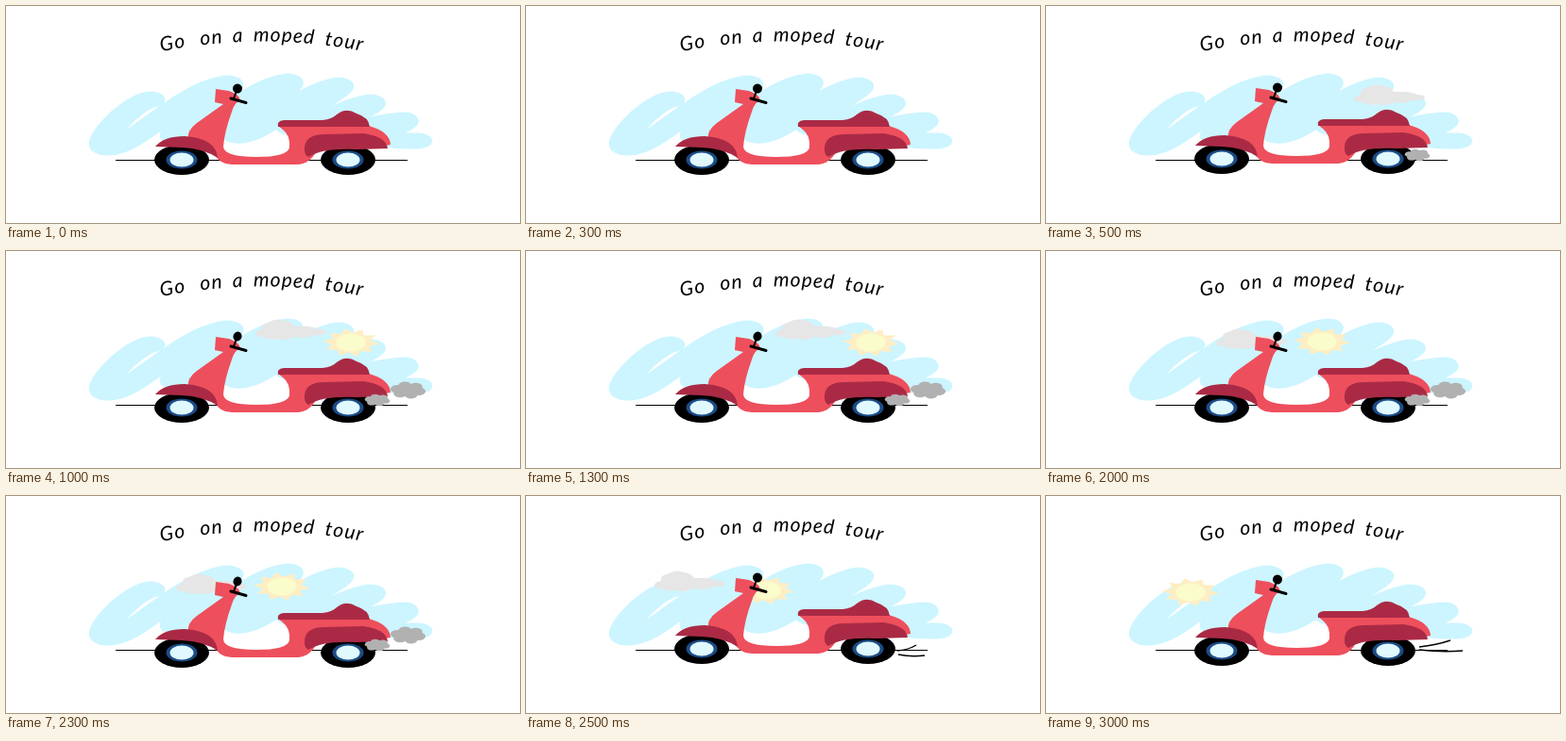
Write an HTML page with a canvas that moves like this. It is 544 px wide and 230 px high and loops after 3500 ms.

```html
<!DOCTYPE html>
<html lang="en">
<head>
<meta charset="utf-8">
<title>Scooter tour</title>
<style>
  html, body { margin: 0; width: 100%; height: 100%; overflow: hidden; background: #fff; }
  canvas { display: block; }
</style>
</head>
<body>
<canvas id="stage" width="544" height="230"></canvas>
<script>
const ctx = document.getElementById('stage').getContext('2d');
const STEP = 500, WIDE = 1.8;
const RED = '#ee4f5c', WINE = '#aa2a45', SKY = '#ccf5ff';

// One pose per half second: scooter bounce, cloud corner, sun centre, exhaust puffs, speed lines
const poses = [
  { bounce: 0 },
  { bounce: -1, cloud: [326, 83], puffs: 1 },
  { bounce: 3, cloud: [264, 72], sun: [365, 97], puffs: 2, turned: true },
  { bounce: 5, cloud: [207, 83], sun: [318, 96], puffs: 1 },
  { bounce: 3, cloud: [180, 82], sun: [292, 96], puffs: 2, turned: true },
  { bounce: -1, cloud: [136, 79], sun: [254, 100],
    lines: 'M393 164Q405 163 413 158M394 168Q408 171 422 169' },
  { bounce: 1, sun: [153, 102],
    lines: 'M395 160Q413 158 428 153M395 163Q419 166 441 164' }
];

const scribble = new Path2D();
scribble.addPath(new Path2D(
  'M153 99C130 104 92 146 106 150C135 152 185 90 234 82C250 82 175 130 178 138' +
  'C205 146 260 84 298 80C312 82 235 125 244 137C268 140 310 92 352 84' +
  'C362 88 290 120 300 128C330 128 360 106 386 102C392 108 345 120 355 128' +
  'C380 130 400 122 421 121C425 126 395 132 400 139C410 144 425 143 436 143'
), new DOMMatrix([1 / WIDE, 0, 0, 1, 0, 0]));

const bodyShape = 'M222 88L236 90Q247 94 248 100Q242 102 239 112Q231 134 230 149' +
  'Q231 160 265 160Q298 160 300 150Q301 137 293 131L288 127L384 127' +
  'Q406 133 407 147L385 151L330 151Q323 167 309 168L239 168Q224 167 221 156' +
  'L193 142Q191 132 202 124L230 104L221 102Z';
const frontFender = 'M158 149Q167 138 189 138Q222 140 224 161Q209 151 186 150Z';
const rearCowl = 'M316 153Q315 136 337 136L378 135Q402 138 404 151L372 152Q335 150 320 160Q316 158 316 153Z';
const seat = 'M288 128Q286 122 294 121L335 121Q345 120 350 115Q360 107 371 114Q384 118 385 128Z';
const cloudShape = 'M0 16Q0 12 7 11Q6 5 13 4Q22 -2 31 2Q38 2 42 8L55 8Q63 9 67 11' +
  'Q75 11 75 14Q72 18 62 17Q52 22 42 19Q34 24 24 21Q14 23 8 19Q3 20 0 16Z';

function fill(path, color) {
  ctx.fillStyle = color;
  ctx.fill(new Path2D(path));
}

function line(path, width) {
  ctx.strokeStyle = '#000';
  ctx.lineWidth = width;
  ctx.stroke(new Path2D(path));
}

function oval(x, y, rx, ry, color, turn = 0) {
  ctx.fillStyle = color;
  ctx.beginPath();
  ctx.ellipse(x, y, rx, ry, turn, 0, 2 * Math.PI);
  ctx.fill();
}

function shifted(x, y, draw) {
  ctx.save();
  ctx.translate(x, y);
  draw();
  ctx.restore();
}

function drawTitle() {
  const words = [['Go', 164], ['on', 206], ['a', 240], ['moped', 262], ['tour', 337]];
  ctx.font = 'italic 21px Lato, sans-serif';
  ctx.textAlign = 'center';
  ctx.fillStyle = '#000';
  for (const [word, start] of words) {
    let x = start;
    for (const letter of word) {
      const width = ctx.measureText(letter).width;
      const offset = x + width / 2 - 272;
      shifted(272 + offset, 37.5 + offset * offset * 0.00092, () => {
        ctx.rotate(Math.atan(offset * 0.00184));
        ctx.fillText(letter, 0, 0);
      });
      x += width + 1;
    }
  }
}

function drawScribble() {
  ctx.save();
  ctx.scale(WIDE, 1);
  ctx.strokeStyle = SKY;
  ctx.lineWidth = 17;
  ctx.lineCap = ctx.lineJoin = 'round';
  ctx.stroke(scribble);
  ctx.restore();
}

function drawSun() {
  const rays = 10;
  ctx.fillStyle = '#ffeec4';
  ctx.beginPath();
  for (let i = 0; i < rays * 2; i++) {
    const angle = i * Math.PI / rays + 0.1;
    const r = i % 2 ? 0.7 : 1;
    ctx.lineTo(30 * r * Math.cos(angle), 15 * r * Math.sin(angle));
  }
  ctx.fill();
  oval(0, 0, 15.5, 9.5, '#fafccb');
}

function drawWheel(x) {
  oval(x, 163, 29, 16, '#000');
  oval(x, 163, 16.5, 9.5, '#1b4c87');
  oval(x, 163, 12.5, 7.5, '#e0f9ff');
}

function drawScooter(turned) {
  drawWheel(186);
  drawWheel(362);
  fill(bodyShape, RED);
  fill(frontFender, WINE);
  fill(rearCowl, WINE);
  fill(seat, WINE);
  ctx.lineCap = 'round';
  line('M244 88Q243 94 241 98', 2);
  line('M238 98L254 102.5', 3);
  oval(245, 87.5, turned ? 4.5 : 5, 5, '#000', 0.3);
}

function drawPuff(x, y, size) {
  const color = '#b1b1b1';
  oval(x, y, 10 * size, 4.5 * size, color);
  for (let i = 0; i < 6; i++) {
    const angle = i * Math.PI / 3 + 0.25;
    oval(x + 8.5 * size * Math.cos(angle), y + 3.5 * size * Math.sin(angle),
      5 * size, 3 * size, color);
  }
}

function render(time) {
  const pose = poses[Math.floor(time / STEP) % poses.length];
  ctx.fillStyle = '#fff';
  ctx.fillRect(0, 0, 544, 230);
  drawScribble();
  drawTitle();
  ctx.lineCap = 'butt';
  line('M116 163.5H425', 1);
  if (pose.cloud) shifted(...pose.cloud, () => fill(cloudShape, '#e6e6e6'));
  if (pose.sun) shifted(...pose.sun, drawSun);
  shifted(0, pose.bounce, () => drawScooter(pose.turned));
  if (pose.puffs) drawPuff(393, 158, 1);
  if (pose.puffs === 2) drawPuff(425.5, 147.5, 1.4);
  if (pose.lines) line(pose.lines, 1.4);
}

const began = performance.now();
function tick() {
  render(performance.now() - began);
  requestAnimationFrame(tick);
}
tick();
</script>
</body>
</html>
```
